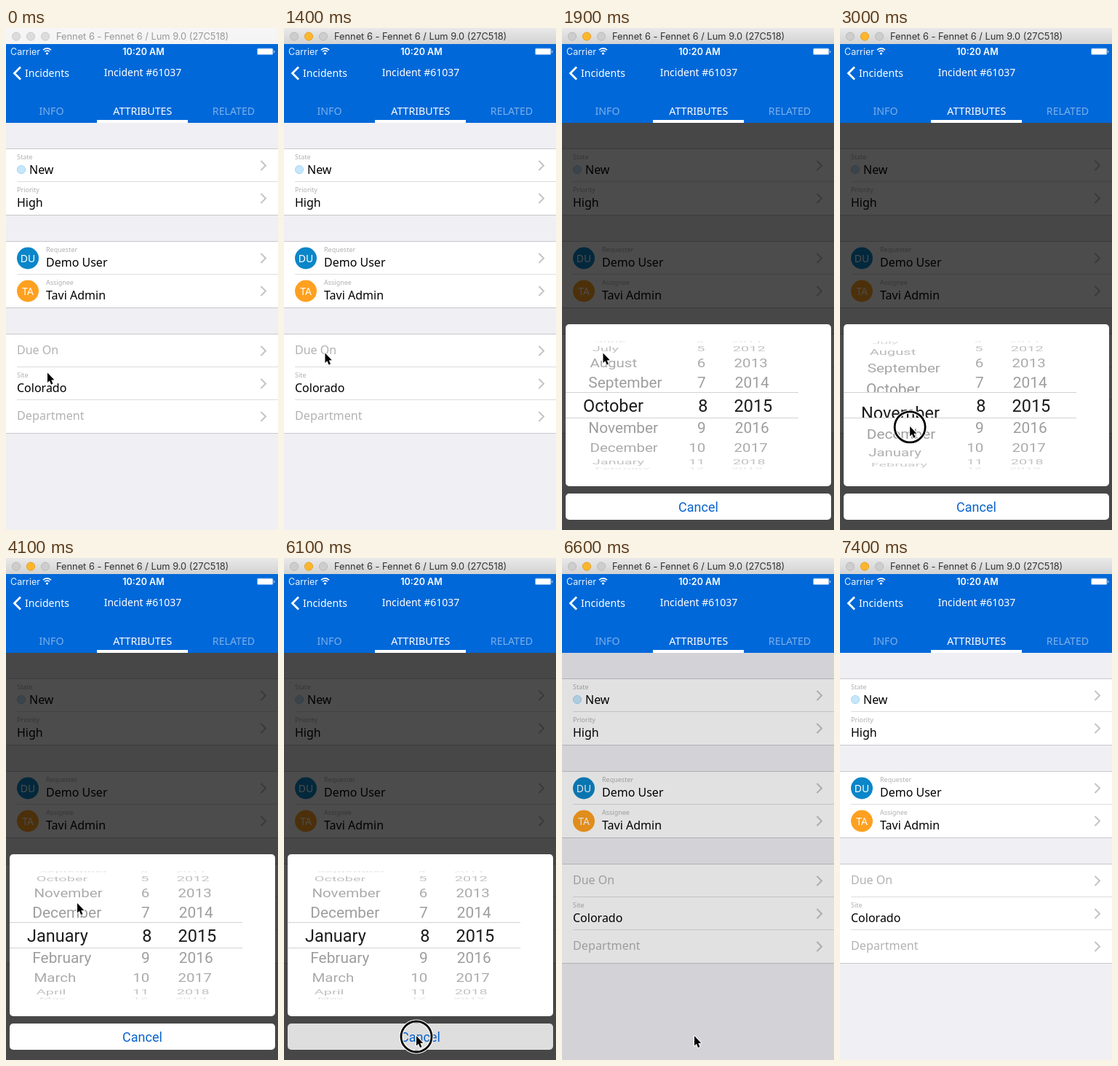
Recreate the animation shown at these times as an HTML page with a canvas. Size 374 px wide and 688 px high, loop 8.2 s.

```html
<!DOCTYPE html>
<html lang="en">
<head>
<meta charset="utf-8">
<title>Incident attributes</title>
<style>
html, body { margin: 0; width: 100%; height: 100%; overflow: hidden; background: #efeff4; }
canvas { display: block; width: 374px; height: 688px; }
</style>
</head>
<body>
<canvas id="stage"></canvas>
<script>
const W = 374, H = 688, LOOP = 8200, STEP = 100;
const canvas = document.getElementById('stage');
const ctx = canvas.getContext('2d');
const dpr = window.devicePixelRatio || 1;
canvas.width = W * dpr;
canvas.height = H * dpr;

const UI = 'Inter, Roboto, sans-serif';
const WHEEL = 'Roboto, Inter, sans-serif';
const APP = '"Noto Sans", "Open Sans", sans-serif';
const MONTHS = ['January', 'February', 'March', 'April', 'May', 'June', 'July',
  'August', 'September', 'October', 'November', 'December'];

const clamp = v => Math.max(0, Math.min(1, v));
const span = (t, a, b) => clamp((t - a) / (b - a));
const smooth = u => u * u * (3 - 2 * u);
const easeOut = u => 1 - (1 - u) ** 3;

function rect(x, y, w, h, fill) {
  ctx.fillStyle = fill;
  ctx.fillRect(x, y, w, h);
}

function card(x, y, w, h, r, fill) {
  ctx.beginPath();
  ctx.roundRect(x, y, w, h, r);
  ctx.fillStyle = fill;
  ctx.fill();
}

function disc(x, y, r, fill, stroke) {
  ctx.beginPath();
  ctx.arc(x, y, r, 0, Math.PI * 2);
  ctx.fillStyle = fill;
  ctx.fill();
  if (stroke) {
    ctx.strokeStyle = stroke;
    ctx.lineWidth = 1;
    ctx.stroke();
  }
}

function text(str, x, y, size, fill, family = APP, align = 'left', weight = 400) {
  ctx.font = `${weight} ${size}px ${family}`;
  ctx.textAlign = align;
  ctx.fillStyle = fill;
  ctx.fillText(str, x, y);
}

function polyline(points, color, width) {
  ctx.beginPath();
  points.forEach(([x, y]) => ctx.lineTo(x, y));
  ctx.strokeStyle = color;
  ctx.lineWidth = width;
  ctx.stroke();
}

function clipTo(x, y, w, h, draw) {
  ctx.save();
  ctx.beginPath();
  ctx.rect(x, y, w, h);
  ctx.clip();
  draw();
  ctx.restore();
}

function drawTitleBar(active) {
  const g = ctx.createLinearGradient(0, 0, 0, 22);
  g.addColorStop(0, active ? '#e9e9e9' : '#f6f6f6');
  g.addColorStop(1, active ? '#d3d3d3' : '#f4f4f4');
  rect(0, 0, W, 22, g);
  [14, 34, 54].forEach((x, i) => {
    const lit = active && i === 1;
    disc(x, 11.5, 5.6, lit ? '#fdb62c' : active ? '#cdcdcd' : '#dcdcdc',
      lit ? '#e0a02a' : active ? '#b9b9b9' : '#cbcbcb');
  });
  text('Fennet 6 - Fennet 6 / Lum 9.0 (27C518)', 69, 16, 12.8, active ? '#333' : '#999', UI);
}

function drawHeader() {
  rect(0, 22, W, 108, '#0068d9');
  text('Carrier', 6, 37, 12.5, 'rgba(255,255,255,.9)', UI);
  ctx.strokeStyle = '#fff';
  ctx.lineWidth = 1.6;
  for (const r of [4.5, 7.6]) {
    ctx.beginPath();
    ctx.arc(56.5, 35.5, r, -Math.PI * 0.76, -Math.PI * 0.24);
    ctx.stroke();
  }
  disc(56.5, 35, 1.6, '#fff');
  text('10:20 AM', 189, 37, 12.5, '#fff', UI, 'center', 600);
  card(345, 27.5, 22.5, 9.5, 2, 'rgba(255,255,255,.45)');
  card(346, 28.5, 20.5, 7.5, 1, '#fff');
  card(368, 31, 1.5, 3, 0.7, 'rgba(255,255,255,.6)');

  polyline([[20, 53.5], [11.5, 62], [20, 70.5]], '#fff', 2.8);
  text('Incidents', 26, 66.5, 14.1, '#fff');
  text('Incident #61037', 188, 65.5, 14, '#fff', APP, 'center');

  const faded = 'rgba(255,255,255,.48)';
  text('INFO', 62.5, 119, 14.2, faded, APP, 'center');
  text('ATTRIBUTES', 187.8, 119, 14.2, '#fff', APP, 'center');
  text('RELATED', 313, 119, 14.2, faded, APP, 'center');
  rect(125, 126, 125, 4, '#fff');
}

function drawSection(top, bottom, dividers) {
  rect(0, top, W, bottom - top, '#fff');
  rect(0, top, W, 1, '#c8c7cc');
  rect(0, bottom, W, 1, '#c8c7cc');
  dividers.forEach(y => rect(15, y, W - 15, 1, '#dddde0'));
}

function field(label, value, x, y, valueX = x) {
  text(label, x, y, 9, '#b0b0b2');
  text(value, valueX, y + 20, 16, '#000');
}

function avatar(initials, y, color) {
  disc(30, y, 15, color);
  text(initials, 30, y + 5, 14, '#fff', APP, 'center');
}

function drawForm() {
  rect(0, 130, W, H - 130, '#efeff4');
  drawSection(165, 256, [210]);
  drawSection(292, 383, [337]);
  drawSection(419, 555, [464, 509]);

  field('State', 'New', 15, 180, 32);
  disc(21, 194, 5.6, '#c6e6fb', '#a9d6f3');
  field('Priority', 'High', 15, 225);
  field('Requester', 'Demo User', 55, 307);
  avatar('DU', 315.5, '#0a86c9');
  field('Assignee', 'Tavi Admin', 55, 352);
  avatar('TA', 360.5, '#ffa020');
  text('Due On', 15, 447, 16, '#b2b2b4');
  field('Site', 'Colorado', 15, 479);
  text('Department', 15, 537, 16.2, '#b2b2b4');

  for (const y of [188.5, 233.5, 315.5, 360.5, 442.5, 487.5, 532.5])
    polyline([[350.5, y - 6.5], [357, y], [350.5, y + 6.5]], '#c3c3c8', 2);
}

const MID = 517, RADIUS = 87.7, ANGLE = 0.361, AXIS = 165;
const COLUMNS = [
  { x: 35.5, bigX: 29, align: 'left', label: i => MONTHS[(i + 120) % 12] },
  { x: 198, bigX: 200.5, align: 'right', label: i => String(i) },
  { x: 238.2, bigX: 236.5, align: 'left', label: i => String(i) }
];

function drawColumn(col, pos, big) {
  const base = Math.round(pos);
  for (let i = base - 4; i <= base + 4; i++) {
    const a = (i - pos) * ANGLE, c = Math.cos(a);
    if (Math.abs(a) > 1.55) continue;
    ctx.save();
    if (big) {
      ctx.translate(0, MID + RADIUS * 1.13 * Math.sin(a));
      ctx.scale(1, c);
      text(col.label(i), col.bigX, 8.5, 23.5, '#1c1c1c', WHEEL, col.align);
    } else {
      ctx.translate(AXIS, MID + RADIUS * Math.sin(a));
      ctx.scale(1 - 0.09 * (1 - c), c);
      text(col.label(i), col.x - AXIS, 7.5, 21, `rgba(0,0,0,${0.4 * c ** 0.65})`, WHEEL, col.align);
    }
    ctx.restore();
  }
}

function drawPicker(month) {
  const wheel = big => [month, 8, 2015].forEach((p, i) => drawColumn(COLUMNS[i], p, big));
  clipTo(5, 429, 320, 70, () => wheel(false));
  clipTo(5, 535, 320, 70, () => wheel(false));
  clipTo(5, 500, 320, 34, () => wheel(true));
  rect(5, 499, 320, 1, '#d2d2d2');
  rect(5, 534, 320, 1, '#d2d2d2');
}

function drawSheet(drop, month, pressed) {
  ctx.save();
  ctx.translate(0, drop);
  card(5, 406, 365, 222, 5, '#fff');
  drawPicker(month);
  card(5, 638, 365, 36, 5, pressed ? '#dedede' : '#fff');
  text('Cancel', 187.5, 663, 18, '#0a63cc', WHEEL, 'center');
  ctx.restore();
}

// Pointer stops: time, x, y
const PATH = [
  [0, 56.5, 472], [600, 56, 445], [1900, 56, 445], [2700, 95, 571], [2800, 95, 571],
  [3400, 97.5, 472.5], [4100, 97.5, 472.5], [4900, 211, 617], [5300, 181.5, 654.5], [LOOP, 181.5, 654.5]
];

function pointerAt(t) {
  const k = PATH.findIndex(p => p[0] > t);
  const [ta, xa, ya] = PATH[k - 1], [tb, xb, yb] = PATH[k];
  const u = smooth(span(t, ta, tb));
  return [xa + (xb - xa) * u, ya + (yb - ya) * u];
}

const within = (t, a, b) => t >= a && t < b;
const isPressed = t => within(t, 1000, 1200) || within(t, 2800, 3400) || within(t, 6100, 6200);

function drawPointer(t) {
  const [x, y] = pointerAt(t);
  if (isPressed(t)) {
    for (const [color, width] of [['#fff', 5], ['#000', 2.8]]) {
      ctx.beginPath();
      ctx.arc(x + 0.5, y + 1.5, 21, 0, Math.PI * 2);
      ctx.strokeStyle = color;
      ctx.lineWidth = width;
      ctx.stroke();
    }
  }
  ctx.save();
  ctx.translate(x, y);
  ctx.beginPath();
  for (const [px, py] of [[0.5, 0.5], [0.5, 14], [3.4, 11.2], [5.6, 16.4], [8, 15.4], [5.8, 10.4], [9.8, 10.2]])
    ctx.lineTo(px, py);
  ctx.closePath();
  ctx.lineJoin = 'round';
  ctx.strokeStyle = '#fff';
  ctx.lineWidth = 2;
  ctx.stroke();
  ctx.fillStyle = '#000';
  ctx.fill();
  ctx.restore();
}

function draw(t) {
  ctx.setTransform(dpr, 0, 0, dpr, 0, 0);
  drawForm();

  const dim = 0.7 * span(t, 1400, 1700) * (1 - span(t, 6300, 6660));
  if (dim > 0) rect(0, 130, W, H - 130, `rgba(0,0,0,${dim})`);

  if (within(t, 1500, 6400)) {
    const rise = easeOut(span(t, 1450, 1900));
    const fall = smooth(span(t, 6150, 6400));
    const month = 9 + 2.75 * smooth(span(t, 2800, 3400)) + 0.25 * easeOut(span(t, 3400, 3800));
    drawSheet(284 * (1 - rise + fall), month, within(t, 6100, 6400));
  }

  drawHeader();
  drawTitleBar(t >= 1000);
  if (t < 7000) drawPointer(t);
}

const start = performance.now();
function tick() {
  const t = (performance.now() - start) % LOOP;
  draw(Math.floor(t / STEP) * STEP);
  requestAnimationFrame(tick);
}
tick();
</script>
</body>
</html>
```
